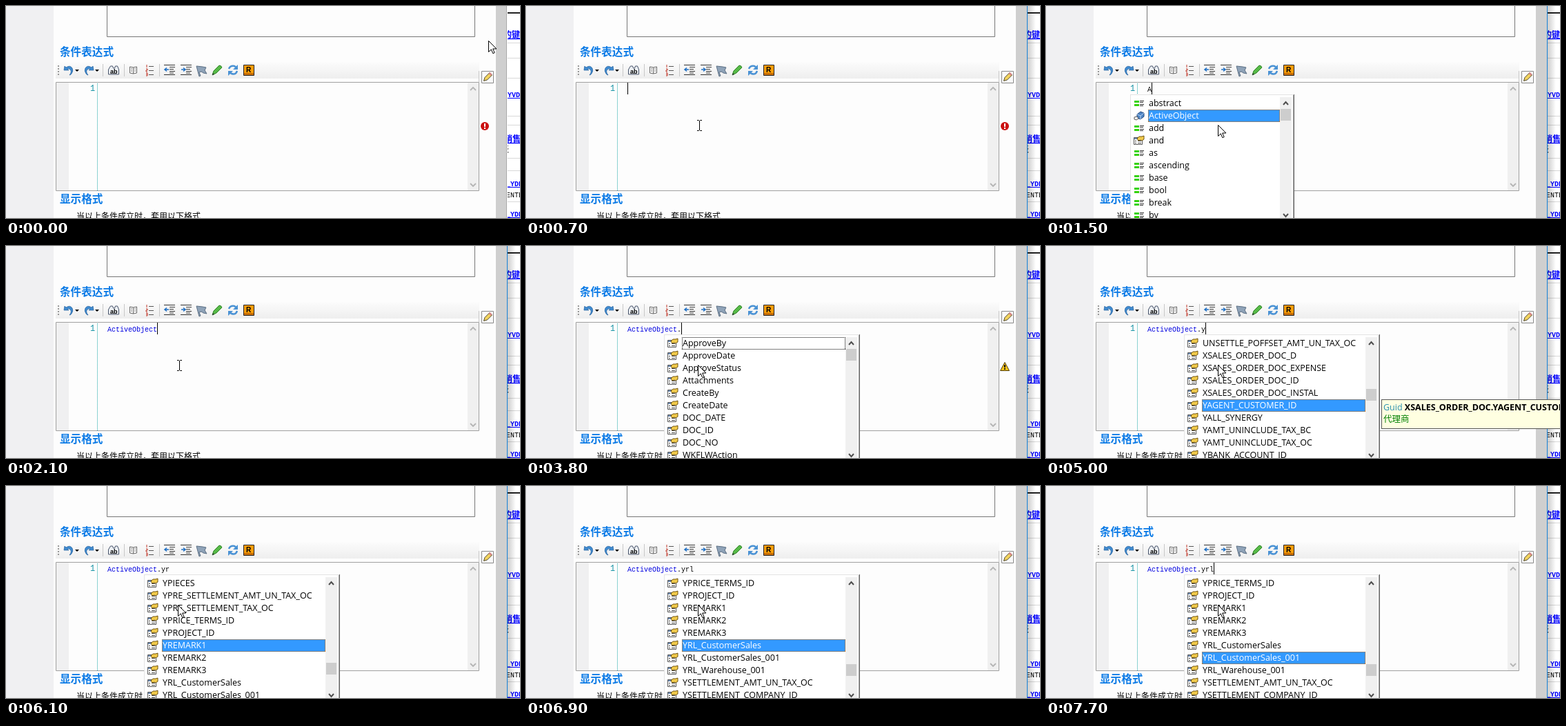
An HTML page that plays this animation: 745 px wide and 307 px high, repeating every 8 s.

```html
<!DOCTYPE html>
<html lang="zh">
<head>
<meta charset="utf-8">
<style>
html, body { margin: 0; width: 745px; height: 307px; overflow: hidden; background: #fdfdfd; }
svg { display: block; }
text { font: 12.5px "Open Sans", "Noto Sans CJK SC", sans-serif; white-space: pre; }
.head { font: bold 15.6px "Noto Sans CJK SC", "Noto Sans CJK", sans-serif; fill: #0a7ae6; }
.note { font: 12px "Noto Sans CJK SC", "Noto Sans CJK", sans-serif; }
.code { font: 10px "Liberation Mono", monospace; }
.num { font: 12px "Liberation Mono", monospace; fill: #1593a5; }
.link { font: bold 10px "Liberation Mono", monospace; fill: #00f; text-decoration: underline; }
.side { font: 10px "Liberation Mono", monospace; }
.wide { font-size: 12px; font-family: "Noto Sans CJK SC", "Noto Sans CJK", sans-serif; }
.bold { font-weight: bold; }
</style>
</head>
<body>
<svg width="745" height="307" viewBox="0 0 745 307">
  <defs>
    <linearGradient id="bar" x2="0" y2="1"><stop stop-color="#fcfcfc"/><stop offset="1" stop-color="#eeeeee"/></linearGradient>
    <linearGradient id="fade"><stop stop-color="#000" stop-opacity=".2"/><stop offset="1" stop-color="#000" stop-opacity="0"/></linearGradient>
    <clipPath id="sideClip"><path d="M727 0h18v307h-18z"/></clipPath>
    <g id="property">
      <path d="M.5 3.500h12v10H.5z" fill="#fff" stroke="#555"/>
      <path d="M1 4h11v2H1z" fill="#6f8db5"/>
      <path d="M2 8.500h2m2 0h5M2 11.500h2m2 0h5" stroke="#444"/>
      <path d="M5 5l3-3h4l3-1v5l-3 2-2-1-3 1z" fill="#f2cb4b" stroke="#6e5312"/>
    </g>
    <g id="keyword">
      <path d="M1 4h7v3H1zM1 9h7v3H1z" fill="#35d20b"/>
      <path d="M9 4.500h6M9 6.500h5M9 9.500h6M9 11.500h5" stroke="#333"/>
    </g>
    <g id="field">
      <path d="M5 6l5-4 5 2v5l-5 4-5-2z" fill="#4d83c4" stroke="#234a7d"/>
      <path d="M5 6l5 2 5-4M10 8v5" fill="none" stroke="#b9d4f2"/>
      <path d="M1 10l4-1 2 3-3 2-3-1z" fill="#fff" stroke="#555"/>
    </g>
    <path id="arrow" d="M.5.5v16l3.800-3.600 2.500 5.800 2.400-1-2.500-5.700h5.200z" fill="#fff" stroke="#000"/>
    <path id="beam" d="M-3.500-7.500h2.500l1 1 1-1h2.500M0-7V7M-3.500 7.500h2.500l1-1 1 1h2.500" fill="none" stroke="#000"/>
    <path id="undo" d="M0 5l1-6 2 2q6-4 9 1 2 4-1 8-1 2-3 2 4-5 1-8-2-2-4-1l2 2z" fill="#3f8bd0" stroke="#245f9c" stroke-width=".7"/>
    <path id="lines" d="M0 .5h16M0 14.500h16M8 3.500h8M8 6.500h6M8 9.500h8M8 12h6" stroke="#333"/>
    <path id="shift" d="M7 7H2M4 4.500L1 7l3 2.500" stroke="#1f6fc4" stroke-width="1.600" fill="none"/>
  </defs>

  <path d="M0 0h69v307H0z" fill="#f0f0f2"/>
  <path d="M146.500 0V44.500H679.500V0" fill="none" stroke="#777"/>
  <text class="head" x="78" y="72">条件表达式</text>
  <text class="head" x="78" y="285">显示格式</text>
  <text class="note" x="102" y="309">当以上条件成立时，套用以下格式</text>

  <path d="M72 81h614v24H72z" fill="url(#bar)"/>
  <path d="M76 86v16" stroke="#999" stroke-width="2" stroke-dasharray="2 2"/>
  <path d="M140.500 84v18M171.500 84v18M222.500 84v18M685.500 94v16" stroke="#c8c8c8"/>
  <use href="#undo" x="84" y="88"/>
  <use href="#undo" transform="translate(127 88) scale(-1 1)"/>
  <path d="M100 92h6l-3 3zM129 92h6l-3 3z"/>
  <path d="M148.500 99v-7l3-5h3l1 3h2l1-3h3l2 5v7z" fill="#eef1f5" stroke="#46536a"/>
  <text x="151" y="98" style="font:bold 9px 'Liberation Sans',sans-serif">ab</text>
  <path d="M179.500 88l5 1 5-1v9l-5 1-5-1zM184.500 89v9M181 91h2m3 0h2m-7 3h2m3 0h2" fill="#fff" stroke="#666"/>
  <path d="M207 87.500h7M207 93.500h7M207 99.500h7" stroke="#555"/>
  <path d="M204 85v4m-1 2h2v2h-2v2h2m-2 2h2v4h-2m0-2h2" fill="none" stroke="#c0392b"/>
  <use href="#lines" x="229" y="85"/>
  <use href="#shift" x="229" y="85"/>
  <use href="#lines" x="253" y="85"/>
  <use href="#shift" transform="translate(261 85) scale(-1 1)"/>
  <path d="M276 87l9 1 5 1-2 4 3 5-5-1-3-2-3 1 2 5-2 1z" fill="#8fa3b8" stroke="#5c6f84"/>
  <path d="M299 100l2-6 8-8q3 0 4 3l-8 8z" fill="#57b947" stroke="#318728"/>
  <path d="M299 100l1-3 2 2z" fill="#333"/>
  <path d="M323 91q2-5 8-4l3 2m1 5q-2 6-8 4l-3-2" fill="none" stroke="#4a92d4" stroke-width="2.500"/>
  <path d="M336 85v7h-7zM322 101v-7h7z" fill="#4a92d4"/>
  <path d="M344.500 85.500h15v15h-15z" fill="#ff9d0a" stroke="#222"/>
  <path d="M345 97h14v3h-14z" fill="#c96f00"/>
  <text x="348" y="96" style="font:bold 10px 'Liberation Sans',sans-serif">R</text>

  <path d="M72.500 110.500h613v157h-613z" fill="#fdfdfd" stroke="#a0a0a0"/>
  <path d="M73 111h18v156H73z" fill="#f0f0f1"/>
  <path d="M669 111h16v156h-16z" fill="#f0f0f0"/>
  <path d="M673 122l4-4 4 4M673 257l4 4 4-4" fill="none" stroke="#b5b5b5" stroke-width="1.800"/>
  <path d="M132.500 112v155" stroke="#1aa6a6" stroke-dasharray="1 1"/>
  <text class="num" x="122" y="123">1</text>

  <path d="M689.500 94.500h17v17h-17z" fill="#fafafa" stroke="#888"/>
  <path d="M692.500 108.500l1.500-5 7-7 3.500 3.500-7 7z" fill="#f2d35d" stroke="#4d472f"/>
  <path d="M699.500 98l2-2 3 3-2 2z" fill="#d98787"/>

  <path d="M727 0h18v307h-18z" fill="#fff"/>
  <path d="M727 9h18v2h-18z" fill="#222"/>
  <path d="M727 53.500h18m-18 22h18m-18 29h18m-18 55h18m-18 13h18m-18 48h18m-18 18h18m-18 45h18" stroke="#d8d8d8"/>
  <g clip-path="url(#sideClip)">
    <text class="link wide" x="721" y="46">的键</text>
    <text class="link" x="727" y="132">YVDE</text>
    <text class="link wide" x="722" y="197">销售</text>
    <text class="side wide" x="717" y="212">表</text>
    <text class="link" x="725" y="261">_YDE</text>
    <text class="side" x="725" y="277">ENTER</text>
    <text class="link" x="725" y="305">_YDE</text>
  </g>
  <path d="M710 0h16v307h-16z" fill="#cfcfcf"/>
  <g id="live"></g>
</svg>
<script>
const live = document.getElementById('live');

const rect = (x, y, w, h, fill, more = '') =>
  `<rect x="${x}" y="${y}" width="${w}" height="${h}" fill="${fill}" ${more}/>`;
const path = (d, more) => `<path d="${d}" ${more}/>`;
const text = (x, y, s, more = '') => `<text x="${x}" y="${y}" ${more}>${s}</text>`;
const use = (id, x, y) => `<use href="#${id}" x="${x}" y="${y}"/>`;
const within = (t, spans) => spans.some(([a, b]) => t >= a && t < b);
const latest = (t, list) => list.filter(e => e[0] <= t).pop();

const typed = [[0, ''], [1500, 'A'], [2000, 'ActiveObject'], [2900, 'ActiveObject.'],
  [4000, 'ActiveObject.y'], [6100, 'ActiveObject.yr'], [6400, 'ActiveObject.yrl']];
const caretOn = [[600, 1100], [1500, 2600], [2900, 3300], [3800, 4400],
  [5000, 5500], [5900, 6100], [6400, 6900], [7500, 8000]];
const warningOn = [[2900, 3100], [3300, 3600], [3800, 4000]];

const words = s => s.split(' ');
const keywords = words('abstract ActiveObject add and as ascending base bool break by');
const members = words('ApproveBy ApproveDate ApproveStatus Attachments CreateBy CreateDate DOC_DATE DOC_ID DOC_NO WKFLWAction');
const yItems = words('UNSETTLE_POFFSET_AMT_UN_TAX_OC XSALES_ORDER_DOC_D XSALES_ORDER_DOC_EXPENSE XSALES_ORDER_DOC_ID XSALES_ORDER_DOC_INSTAL YAGENT_CUSTOMER_ID YALL_SYNERGY YAMT_UNINCLUDE_TAX_BC YAMT_UNINCLUDE_TAX_OC YBANK_ACCOUNT_ID');
const yrItems = words('YPIECES YPRE_SETTLEMENT_AMT_UN_TAX_OC YPRE_SETTLEMENT_TAX_OC YPRICE_TERMS_ID YPROJECT_ID YREMARK1 YREMARK2 YREMARK3 YRL_CustomerSales YRL_CustomerSales_001 YRL_Warehouse_001 YSETTLEMENT_AMT_UN_TAX_OC YSETTLEMENT_COMPANY_ID');

// start, items, selected row, thumb top
const lists = [[0], [1500, keywords, 1, 149], [2000], [3000, members, -1, 149], [4100, yItems, 5, 207],
  [6100, yrItems.slice(0, 10), 5, 256], [6500, yrItems.slice(3), 5, 258], [7700, yrItems.slice(3), 6, 258]];
// start, x, y, width, height, type, name, description
const tips = [[0], [1900, 360, 150, 250, 24, 'Object', 'XSALES_ORDER.ActiveObject', ''], [2000],
  [4500, 486, 222, 300, 43, 'Guid', 'XSALES_ORDER_DOC.YAGENT_CUSTOMER_ID', '代理商'], [6100],
  [7000, 486, 222, 300, 43, 'String', 'XSALES_ORDER_DOC.YRL_CustomerSales', '客户销售'], [7700]];

// dotted outline aligned to whole pixels
const focus = (x, y, w, h, color) =>
  path(`M${x} ${y + .5}h${w}M${x} ${y + h - .5}h${w}M${x + .5} ${y}v${h}M${x + w - .5} ${y}v${h}`,
    `stroke="${color}" stroke-dasharray="1 1"`);

function popup([, items, selected, thumb]) {
  if (!items) return '';
  const first = items === keywords, x = first ? 122 : 200, w = first ? 238 : 284;
  const bar = x + w - 21, rowX = x + 26, rowW = bar - rowX;
  let out = rect(x, 128, w, 190, '#e3e3e3') + rect(x + 1, 129, w - 1, 190, '#fff');
  out += rect(x + w - 2, 129, 1, 190, '#a0a0a0') + rect(x + w - 1, 128, 1, 190, '#696969');
  out += rect(bar, 132, 17, 180, '#f0f0f0') + rect(bar + 1, thumb, 15, 17, '#cdcdcd');
  out += path(`M${bar + 5} 143l3.500-4 3.500 4M${bar + 5} 301l3.500 4 3.500-4`,
    'fill="none" stroke="#505050" stroke-width="2"');
  items.forEach((name, i) => {
    const y = 132 + 18 * i, on = i === selected;
    if (on) out += rect(rowX, y, rowW, 18, '#3399ff') + focus(rowX, y, rowW, 18, '#cc6600');
    const icon = !first || name === 'and' ? 'property' : on ? 'field' : 'keyword';
    out += use(icon, x + 5, y + 1) + text(x + 27, y + 13, name, on ? 'fill="#fff"' : '');
  });
  if (selected < 0) out += focus(rowX, 132, rowW, 18, '#000');
  return out;
}

function tip([, x, y, w, h, type, name, note]) {
  if (!x) return '';
  return rect(x + .5, y + .5, w - 1, h - 1, '#ffffe1', 'stroke="#555"') +
    text(x + 3, y + 16, `<tspan fill="#2b91af">${type}</tspan> <tspan class="bold">${name}</tspan>`) +
    text(x + 3, y + 33, note, 'fill="#008000"');
}

function status(t) {
  if (t < 1500) return '<circle cx="694" cy="174" r="6" fill="#cb1010"/>' +
    path('M693 170h2v5h-2zM693 176h2v2h-2z', 'fill="#fff"');
  if (!within(t, warningOn)) return '';
  return path('M694 168.500l6.500 12h-13z', 'fill="#ffc61a" stroke="#4a3a08" stroke-linejoin="round"') +
    path('M693 172h2v4h-2zM693 177h2v2h-2z', 'fill="#111"');
}

function pointer(t, listOpen) {
  const p = Math.min(t / 600, 1), k = p * p * (3 - 2 * p);
  const x = Math.round(699 - 450 * k), y = Math.round(50 + 122 * k);
  const inEditor = x > 132 && x < 669 && y > 111;
  return inEditor && !listOpen ? use('beam', x + 2.5, y + 1) : use('arrow', x, y);
}

function scene(t) {
  const code = latest(t, typed)[1], list = latest(t, lists);
  const known = code.startsWith('ActiveObject') ? 12 : 0;
  const active = t >= 600;
  let out = rect(active ? 726 : 725, 0, 1, 307, active ? '#1883d7' : '#aaa');
  if (active) out += rect(727, 0, 12, 307, 'url(#fade)');
  out += text(147, 124, `<tspan fill="#0000e0">${code.slice(0, known)}</tspan>${code.slice(known)}`, 'class="code"');
  if (within(t, caretOn)) out += rect(147 + 6 * code.length, 111, 1, 17, '#000');
  return out + status(t) + popup(list) + tip(latest(t, tips)) + pointer(t, list[1]);
}

let shown = -1;
function frame(now) {
  const t = Math.floor(now % 8000 / 100) * 100;
  if (t !== shown) live.innerHTML = scene(shown = t);
  requestAnimationFrame(frame);
}
frame(performance.now());
</script>
</body>
</html>
```
